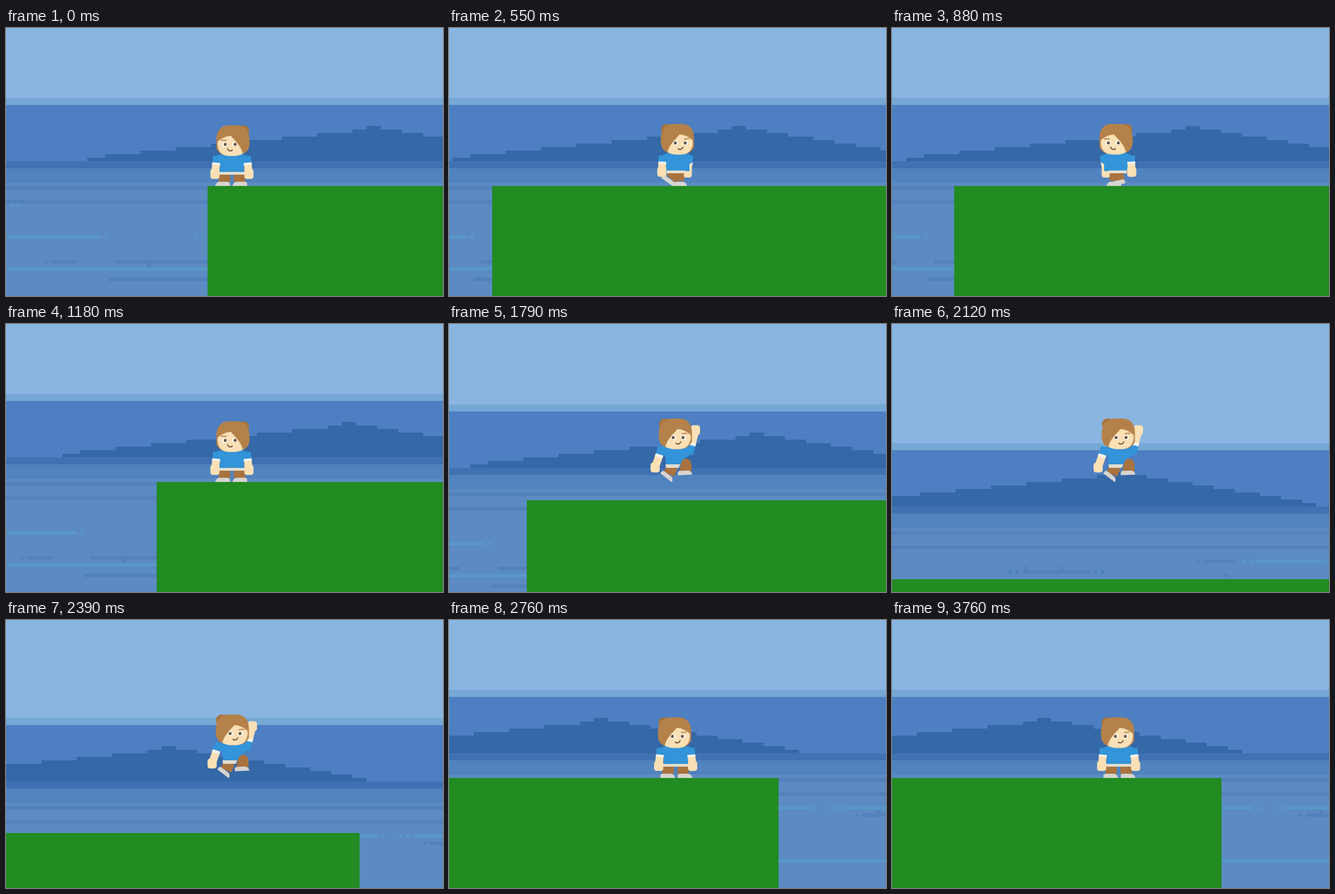
Recreate the animation shown at these times as an HTML page with a canvas. Size 618x380 px, loop 3.79 s.

```html
<!DOCTYPE html>
<html lang="en">
<head>
<meta charset="utf-8">
<title>Platform jump</title>
<style>
html, body { margin: 0; width: 100%; height: 100%; overflow: hidden; }
canvas { display: block; }
</style>
</head>
<body>
<canvas id="stage" width="618" height="380"></canvas>
<script>
const W = 618, H = 380, LOOP = 3790, CELL = 5;
const ctx = document.getElementById('stage').getContext('2d');
const SKIN = '#fbe0b5', HAIR = '#b5814a', BUN = '#a5733f', SHIRT = '#3394d9',
  PANTS = '#a9733f', SHOE = '#d6d4cf', BELT = '#e2dccd',
  DARK = '#5381bc', TEAL = '#5897c5';

const START = 17, TURN = 650, STOP = 1170, RESTART = 1435, JUMP = 1752, LAND = 2520;

// Distance covered when speed ramps up, holds, then ramps down
function glide(t, from, to, distance, up, down) {
  const span = to - from, speed = distance / (span - (up + down) / 2);
  const u = Math.min(span, Math.max(0, t - from));
  if (u < up) return speed * u * u / (2 * up);
  const left = span - u;
  if (left < down) return distance - speed * left * left / (2 * down);
  return speed * (u - up / 2);
}

const travel = t =>
  glide(t, START, TURN, 259, 427, 100) +
  glide(t, TURN, STOP, -187, 250, 150) +
  glide(t, RESTART, LAND, 547, 427, 175);

const height = t => Math.max(0, .000938 * (t - JUMP) * (LAND - t));

function rect(color, x, y, w, h) {
  ctx.fillStyle = color;
  ctx.fillRect(x, y, w, h);
}

// Steady 50px steps up to the peak, shorter ones down
function ridge() {
  for (let i = 0; i < 10; i++) {
    const left = Math.max(115, Math.min(510, 90 + 50 * i));
    const down = 9 - i;
    const right = Math.min(800, 530 + Math.floor(down * 31.7 / CELL) * CELL);
    rect('#3568a6', left, 184 - i * CELL, right - left, CELL);
  }
}

// A streak of light or shade with a few stray cells around it
function streak(color, x, y, length, before = 0, after = 0) {
  rect(color, x, y, length, CELL);
  for (let i = 1; i <= before; i++) rect(color, x - 10 * i, y, CELL, CELL);
  for (let i = 1; i <= after; i++) rect(color, x + length + 10 * i - CELL, y, CELL, CELL);
}

function ripples() {
  for (const x of [-40, 700]) streak(TEAL, x, 339, 370);
  streak(TEAL, -40, 294, 175, 0, 1);
  streak(TEAL, 285, 294, 150, 2);
  for (const x of [715, 865]) streak(TEAL, x, 264, 100, 2, 1);
  streak(TEAL, 5, 249, CELL, 0, 1);
  streak(DARK, 65, 329, 35, 1);
  streak(DARK, 640, 264, 45, 1);
  streak(DARK, 385, 279, 95, 2, 2);
  streak(DARK, 890, 274, 70, 1);
  for (const y of [329, 354]) streak(DARK, y === 329 ? 155 : 145, y, 150);
  for (const [x, y] of [[200, 334], [387, 274], [437, 274], [670, 284], [909, 269]])
    rect(DARK, x, y, CELL, CELL);
}

function scenery(dx, dy) {
  rect('#8ab5e0', 0, 0, W, H);
  ctx.save();
  ctx.translate(0, dy);
  rect('#76a8d6', 0, 99, W, 10);
  rect('#4d7fc2', 0, 109, W, 80);
  rect('#4071b2', 0, 189, W, 10);
  rect('#5183bf', 0, 199, W, 20);
  rect('#5b8bc2', 0, 219, W, H);
  for (const y of [224, 244]) rect(DARK, 0, y, W, CELL);
  ctx.translate(dx, 0);
  ridge();
  ripples();
  ctx.restore();
}

function shape(color, d) {
  ctx.fillStyle = color;
  ctx.fill(new Path2D(d));
}

function oval(color, x, y, rx, ry = rx) {
  ctx.fillStyle = color;
  ctx.beginPath();
  ctx.ellipse(x, y, rx, ry, 0, 0, 7);
  ctx.fill();
}

function line(color, width, d) {
  ctx.strokeStyle = color;
  ctx.lineWidth = width;
  ctx.stroke(new Path2D(d));
}

function arm(x, y, fx, fy) {
  const part = (color, a, b) => line(color, 11,
    `M${x + (fx - x) * a} ${y + (fy - y) * a}L${x + (fx - x) * b} ${y + (fy - y) * b}`);
  part(SKIN, .3, 1);
  part('#f6f4ee', .25, .42);
  part(SHIRT, -.15, .27);
  ctx.fillStyle = SKIN;
  ctx.beginPath();
  ctx.roundRect(fx - 6.5, fy - 7, 13, 14, 4);
  ctx.fill();
}

function leg(hx, hy, ax, ay, sx, sy, angle) {
  line(PANTS, 16, `M${hx} ${hy}L${ax} ${ay}`);
  ctx.save();
  ctx.translate(sx, sy);
  ctx.rotate(angle);
  shape(SHOE, 'M-10 3V-1Q-9-3-7-3H5Q10-2 10.5 3Z');
  ctx.restore();
}

function head(dx, dy) {
  ctx.save();
  ctx.translate(dx, dy);
  oval(BUN, 304, 146, 8);
  shape(HAIR, 'M295.5 162C295.5 144 304 138 314 138H325C337 138 343 147 342.5 159V171C338 180 330 182 320 181L306 179C298 176 295.5 170 295.5 162Z');
  shape(SKIN, 'M305 178C308 167 315 161 322 153C328 153 335 156 340.5 161C342 172 337 181 324 181.5C316 182 310 181 305 178Z');
  for (const x of [316.5, 330.5]) {
    oval('#fff', x, 165, 3.4, 3);
    oval('#66594c', x - .5, 165, 2.2);
  }
  line(HAIR, 1.5, 'M328 159.5L336 159');
  line('#6b4735', 1.5, 'M319.5 173Q325 176.5 327 170.5');
  ctx.restore();
}

function standing() {
  leg(310, 207, 310, 218, 309, 221, 0);
  leg(331, 207, 331, 218, 333.5, 221, 0);
  shape(SHIRT, 'M296 183C302 178 312 178 320 180C330 178 340 178 345 183L347 190L338 193V206H304V193L294 190Z');
  rect(BELT, 303, 204, 36, 4);
  arm(299, 185, 296.5, 207);
  arm(342, 185, 344.5, 207);
  head(0, 0);
}

function running(t) {
  const swing = Math.cos((t - 550) / 65), lift = Math.max(0, swing), back = Math.max(0, -swing);
  const stride = (x, amount) => leg(x, 205, x + 1 - 8 * amount, 217 - 3 * amount,
    326 - 16 * amount, 221 - 5 * amount, .6 * amount);
  arm(340, 184, 337 + 2 * back, 205);
  stride(324, back);
  stride(321, lift);
  shape(SHIRT, 'M299 184C304 177 312 176 321 178C331 176 340 177 345 183L344 191L340 193V203H308L305 192L298 190Z');
  rect(BELT, 308, 202, 26, 4);
  arm(302, 184, 301 + 3 * back, 204);
  head(4, -2);
}

function jumping() {
  shape(PANTS, 'M326 208L328 197Q330 191 336 191Q342 192 343 199V209Z');
  leg(335, 204, 335, 208, 333.5, 211, -.04);
  leg(316, 202, 311, 213, 308.5, 215.5, .65);
  arm(341, 180, 348.5, 150.5);
  shape(SHIRT, 'M297 176C304 172 313 175 322 177C331 175 340 173 346 174L345 183L339 187L330 193L327 200H307L306 189Z');
  shape(BELT, 'M306 199H327L325 204H307Z');
  arm(300, 178, 291.5, 203.5);
  head(1, -4);
}

function figure(t) {
  const facingLeft = t < START || (t >= TURN && t < RESTART);
  ctx.save();
  if (facingLeft) {
    ctx.translate(640, 0);
    ctx.scale(-1, 1);
  }
  if (t >= JUMP && t < LAND) jumping();
  else if ((t >= START && t < STOP) || (t >= RESTART && t < JUMP)) running(t);
  else standing();
  ctx.restore();
}

// The backdrop follows at half speed, in whole cells
const toCell = v => Math.ceil(v / 2 / CELL) * CELL;

function draw(t) {
  const x = Math.round(travel(t)), y = Math.round(height(t));
  scenery(toCell(-x), toCell(y));
  figure(t);
  rect('#228b22', 285 - x, 224 + y, 800, H);
}

let start;
function frame(now) {
  start ??= now;
  draw((now - start) % LOOP);
  requestAnimationFrame(frame);
}
draw(0);
requestAnimationFrame(frame);
</script>
</body>
</html>
```
